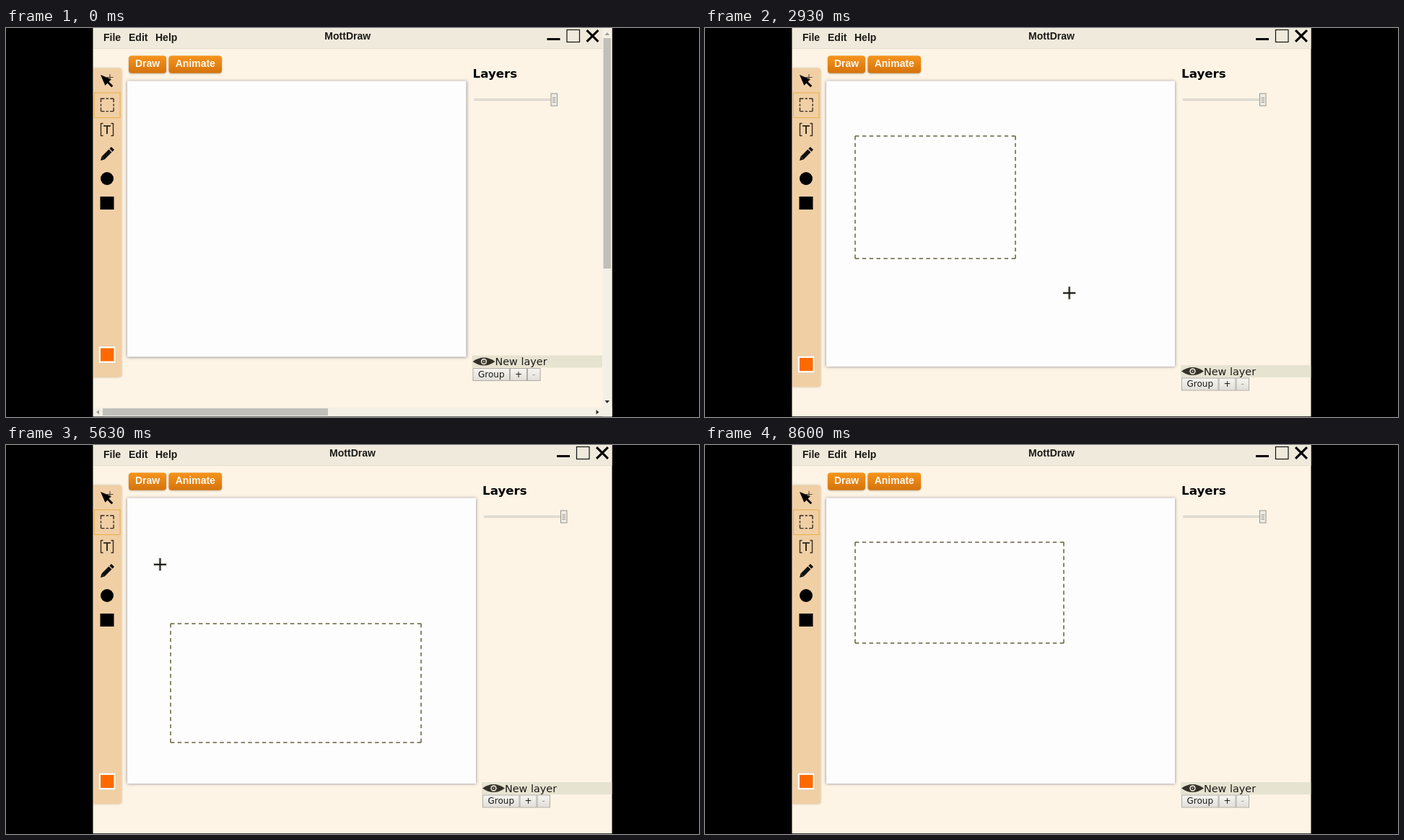
An HTML page with a canvas for the animation above (8730 ms loop, 960x540 px).

```html
<!DOCTYPE html>
<html lang="en">
<head>
<meta charset="utf-8">
<title>MottDraw</title>
<style>
  html, body { margin: 0; width: 100%; height: 100%; overflow: hidden; background: #000; }
  canvas { display: block; width: 960px; height: 540px; }
</style>
</head>
<body>
<canvas id="stage" width="960" height="540"></canvas>
<script>
const c = document.getElementById('stage').getContext('2d');
const LOOP = 8730;
const ZOOM = 0.9;    // stage px per app px
const BAR = 13.5;    // scrollbar thickness
const LAG = 15;      // the selection trails the pointer
const RELEASE = 80;  // the button is held a little after a drag
const BOLD = 'bold 14px "Liberation Sans", sans-serif';
const UI = '"DejaVu Sans", sans-serif';
const INK = '#1b1a16';

// Pointer legs; "bend" delays the vertical part of a leg
const ENTRY = { x: 850, y: 30 };
const LEGS = [
  { from: 350, to: 1200, x: 208, y: 150 },
  { from: 1400, to: 1910, x: 320, y: 238, drag: true },
  { from: 1950, to: 2500, x: 430, y: 320, drag: true },
  { from: 2620, to: 3230, x: 575, y: 413 },
  { from: 3350, to: 3750, x: 463, y: 312, drag: true },
  { from: 3770, to: 5140, x: 228, y: 248, drag: true, bend: 4.4 },
  { from: 5250, to: 5830, x: 208, y: 135 },
  { from: 5950, to: 6560, x: 497, y: 275, drag: true },
  { from: 7260, to: 8100, x: 850, y: 329 }
];
const dragStart = LEGS.find(l => l.drag).from;

const clamp = u => Math.max(0, Math.min(1, u));
const ease = u => u * u * (3 - 2 * u);
const mix = (a, b, u) => a + (b - a) * u;
const legAt = t => LEGS.findLastIndex(l => t >= l.from);

function pointer(t) {
  const i = legAt(t);
  if (i < 0) return ENTRY;
  const leg = LEGS[i], a = LEGS[i - 1] || ENTRY;
  const u = ease(clamp((t - leg.from) / (leg.to - leg.from)));
  return { x: mix(a.x, leg.x, u), y: mix(a.y, leg.y, u ** (leg.bend || 1)) };
}

function box(x, y, w, h, fill) {
  c.fillStyle = fill;
  c.fillRect(x, y, w, h);
}

function frame(x, y, w, h, color, width = 1) {
  c.strokeStyle = color;
  c.lineWidth = width;
  c.strokeRect(x, y, w, h);
}

function round(x, y, w, h, r, fill) {
  c.fillStyle = fill;
  c.beginPath();
  c.roundRect(x, y, w, h, r);
  c.fill();
}

function line(x1, y1, x2, y2, color, width) {
  c.strokeStyle = color;
  c.lineWidth = width;
  c.beginPath();
  c.moveTo(x1, y1);
  c.lineTo(x2, y2);
  c.stroke();
}

function plus(x, y, r, color, width) {
  line(x - r, y, x + r, y, color, width);
  line(x, y - r, x, y + r, color, width);
}

function disc(x, y, r, fill) {
  c.fillStyle = fill;
  c.beginPath();
  c.arc(x, y, r, 0, 7);
  c.fill();
}

function triangle(w, h, fill) {
  c.fillStyle = fill;
  c.beginPath();
  c.moveTo(0, 0);
  c.lineTo(-w, h);
  c.lineTo(w, h);
  c.fill();
}

function at(x, y, turn, paint) {
  c.save();
  c.translate(x, y);
  c.rotate(turn * Math.PI / 4);
  paint();
  c.restore();
}

function text(s, x, y, font, fill = INK, align = 'left') {
  c.font = font;
  c.fillStyle = fill;
  c.textAlign = align;
  c.fillText(s, x, y);
}

function fade(y, h, top, end) {
  const g = c.createLinearGradient(0, y, 0, y + h);
  g.addColorStop(0, top);
  g.addColorStop(1, end);
  return g;
}

function shadowed(color, blur, y, paint) {
  c.save();
  c.shadowColor = color;
  c.shadowBlur = blur;
  c.shadowOffsetY = y;
  paint();
  c.restore();
}

function titleBar(right) {
  box(121, 0, right - 121, 28, '#f0eadc');
  box(121, 28, right - 121, 1, '#e6dfd0');
  text('File', 135, 18, BOLD);
  text('Edit', 170, 18, BOLD);
  text('Help', 207, 18, BOLD);
  text('MottDraw', (120 + right) / 2, 15.5, BOLD, INK, 'center');
  box(right - 77, 14, 18, 3, '#000');
  frame(right - 49.5, 2.5, 17.5, 17, '#111', 1.2);
  at(right - 14, 11, 1, () => plus(0, 0, 11.2, '#000', 3));
}

function tab(label, x, w) {
  shadowed('rgba(110,80,30,.5)', 2, 1, () =>
    round(x, 38.5, w, 24, 4, fade(38, 25, '#f7951c', '#d5720c')));
  text(label, x + w / 2, 54, BOLD, '#fff8ee', 'center');
}

function toolbox(bottom) {
  const x = 140;
  shadowed('rgba(140,110,70,.5)', 3, 0, () =>
    round(121, 56, 39, bottom - 56, [0, 4, 4, 0], '#f1cfa5'));
  frame(122.5, 90, 35.5, 34.5, '#e6b04c');
  // move
  at(131, 65, -1, () => {
    triangle(6, 15, '#000');
    box(-1.5, 12, 3, 11, '#000');
  });
  plus(x + 4, 68.5, 4.5, '#4d4436', 1);
  // select
  c.setLineDash([5, 2.2, 3.2, 2.2, 5, 0]);
  frame(131.5, 98, 17.6, 17.6, '#332c20', 1.4);
  c.setLineDash([]);
  // text
  for (const side of [-1, 1]) {
    const edge = x + side * 8.5;
    line(edge, 132, edge, 150, '#332c20', 1.4);
    for (const y of [132.5, 149.5]) line(edge, y, edge - side * 3, y, '#332c20', 1.4);
  }
  box(135, 135, 10, 1.8, '#332c20');
  box(139, 135, 2, 12, '#332c20');
  // pencil
  at(131, 184, 1, () => {
    triangle(2.9, -5, '#111');
    box(-2.9, -19, 5.8, 14, '#111');
    box(-2.9, -24, 5.8, 3.6, '#111');
  });
  disc(x, 209, 9, '#000');
  box(130.5, 234, 19, 18, '#000');
  // colour
  const y = bottom - 43;
  box(128, y, 24, 24, '#fffaf0');
  frame(128, y, 24, 24, '#dcc39e', 0.8);
  box(131, y + 3, 18.5, 18, '#ff6a00');
}

function button(label, x, y, w, ink = INK) {
  box(x, y, w, 17, fade(y, 17, '#f8f6f2', '#e2dfda'));
  frame(x + .5, y + .5, w - 1, 17, '#aeaaa2');
  text(label, x + w / 2, y + 12.5, '12px ' + UI, ink, 'center');
}

function eye(x, y) {
  c.fillStyle = '#34312a';
  c.beginPath();
  c.moveTo(x - 15.5, y);
  c.quadraticCurveTo(x, y - 11, x + 15.5, y);
  c.quadraticCurveTo(x, y + 11, x - 15.5, y);
  c.fill();
  disc(x, y, 4.2, '#e6e3d2');
  disc(x, y, 2.6, '#34312a');
  disc(x, y, 0.9, '#e6e3d2');
}

function layers(right, bottom) {
  const x = right - 180, y = bottom - 72;
  text('Layers', x, 68.5, 'bold 16.7px ' + UI, '#000');
  box(x + 2, 98, 107, 3, '#d3cfc8');
  box(x + 2, 99, 107, 1, '#ebe7df');
  box(x + 108, 91, 9, 17, '#efece6');
  frame(x + 108.5, 91, 8.5, 17, '#99958c');
  for (let i = 0; i < 3; i++) box(x + 110.5, 96.5 + i * 3, 4.5, 1, '#8a867c');

  box(x - 1, y, 180.5, 17, '#e7e3d1');
  eye(x + 15.5, y + 8.5);
  text('New layer', x + 31, y + 13.7, '14.4px ' + UI);
  button('Group', x, y + 17.5, 51.5);
  button('+', x + 51.5, y + 17.5, 24);
  button('-', x + 75.5, y + 17.5, 18.5, '#9b978e');
}

function scrollbars() {
  box(826.5, 0, BAR, 540, '#f5f0e6');
  box(121, 526.5, 719, BAR, '#f5f0e6');
  box(827.5, 14, 10.5, 320, '#c1bfba');
  box(134, 528, 312, 10, '#c1bfba');
  at(832.8, 6, 0, () => triangle(3.3, 4, '#a3a19c'));
  at(832.8, 521, 4, () => triangle(3.3, 4, '#333'));
  at(125, 533.2, -2, () => triangle(3.3, 4, '#a3a19c'));
  at(821.5, 533.2, 2, () => triangle(3.3, 4, '#333'));
}

// Gaps are fitted so every side begins and ends with a dash
function dashed(x1, y1, x2, y2) {
  const len = Math.hypot(x2 - x1, y2 - y1), on = 5.4;
  const n = Math.max(1, Math.round((len - on) / 9.9));
  c.setLineDash(len > 2 * on ? [on, (len - on) / n - on] : []);
  line(x1, y1, x2, y2, '#65613c', 1.5);
  c.setLineDash([]);
}

function selection(t) {
  const now = legAt(t);
  const last = LEGS.findLastIndex((l, i) => i <= now && l.drag);
  if (last < 0) return;
  let first = last;
  while (LEGS[first - 1].drag) first--;
  const a = LEGS[first - 1];
  const p = pointer(Math.max(LEGS[first].from, Math.min(t - LAG, LEGS[last].to)));
  const l = Math.min(a.x, p.x), r = Math.max(a.x, p.x);
  const top = Math.min(a.y, p.y), bottom = Math.max(a.y, p.y);
  if (r - l < 1) return;
  for (const y of [top, bottom]) dashed(l, y, r, y);
  for (const x of [l, r]) dashed(x, top, x, bottom);

  const held = LEGS[last + 1].drag || t < LEGS[last].to + RELEASE;
  if (!held) return;
  const size = v => Math.round(v / ZOOM) + 'px';
  text(size(r - l), (l + r) / 2, a.y - 8.5, '9px ' + UI);
  text(size(bottom - top), a.x - 36, (top + bottom) / 2 + .5, '9px ' + UI);
}

function crosshair(t) {
  const { x, y } = pointer(t);
  plus(x, y, 9, 'rgba(150,148,130,.5)', 4);
  plus(x, y, 8.5, '#111', 1.7);
}

function draw(t) {
  const bars = t < dragStart;
  const right = bars ? 840 - BAR : 840, bottom = bars ? 540 - BAR : 540;
  box(0, 0, 960, 540, '#000');
  c.save();
  c.beginPath();
  c.rect(120.5, 0, 719, 539.3);
  c.clip();
  box(120, 0, 720, 540, '#fdf4e5');
  titleBar(right);
  tab('Draw', 170, 52);
  tab('Animate', 225.5, 73.5);
  toolbox(bottom - 42);
  shadowed('rgba(80,80,100,.7)', 4, 0, () =>
    box(168, 73.5, right - 357, bottom - 143.5, '#fdfdfd'));
  layers(right, bottom);
  if (bars) scrollbars();
  selection(t);
  crosshair(t);
  c.restore();
}

const begin = performance.now();
function tick() {
  draw((performance.now() - begin) % LOOP);
  requestAnimationFrame(tick);
}
tick();
</script>
</body>
</html>
```
